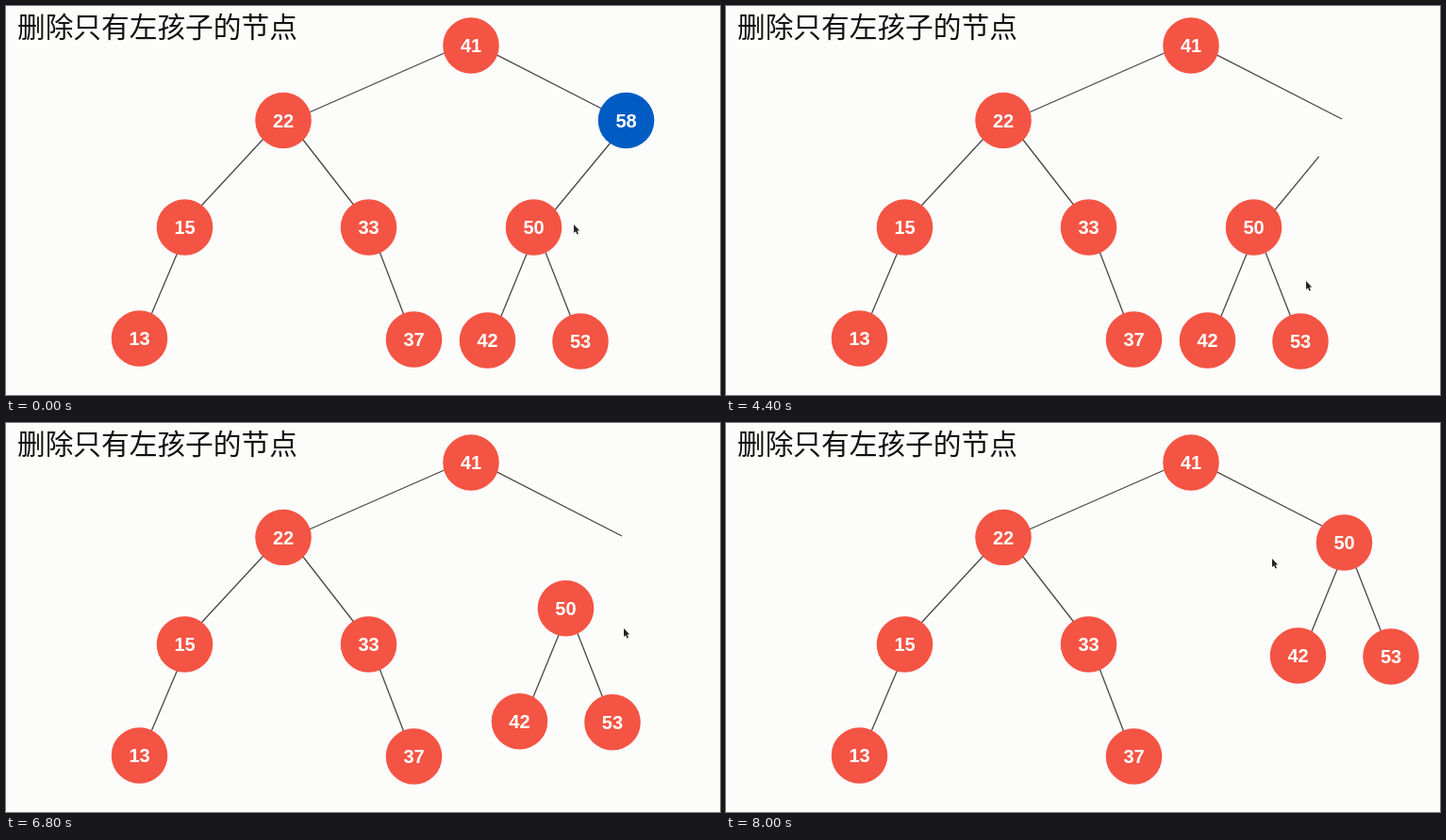
An HTML page with a canvas for the animation above (8100 ms loop, 757x413 px).

```html
<!DOCTYPE html>
<html lang="zh">
<head>
<meta charset="utf-8">
<style>
  html, body { margin: 0; width: 100%; height: 100%; overflow: hidden; background: #fcfcfb; }
  canvas { display: block; }
</style>
</head>
<body>
<canvas id="stage" width="757" height="413"></canvas>
<script>
const ctx = document.getElementById('stage').getContext('2d');
const LOOP = 8100, STEP = 100, GLIDE = 400;
const RED = '#f45443', BLUE = '#005cc3';
const arrow = new Path2D('M0 0V9L2 7.2L3.6 10.6L5 10L3.5 6.6H6.2Z');

// Pointer stops: arrival time, x, y
const stops = [
  [0, 602, 232], [1100, 588, 246], [1400, 670, 200], [2100, 714, 215],
  [3100, 622, 201], [3500, 648, 208], [4400, 615, 292], [4900, 515, 197],
  [5200, 488, 272], [5600, 603, 335], [5800, 645, 174], [6100, 655, 218],
  [7800, 579, 144]
];

const progress = (t, from, to) => Math.min(1, Math.max(0, (t - from) / (to - from)));
const mix = (a, b, p) => a + (b - a) * p;

function line(x1, y1, x2, y2) {
  ctx.beginPath();
  ctx.moveTo(x1, y1);
  ctx.lineTo(x2, y2);
  ctx.stroke();
}

function node(label, x, y, color = RED) {
  ctx.fillStyle = color;
  ctx.beginPath();
  ctx.arc(x, y, 29.8, 0, Math.PI * 2);
  ctx.fill();
  ctx.fillStyle = '#fff';
  ctx.font = 'bold 20px "Liberation Sans", Arial, sans-serif';
  ctx.textAlign = 'center';
  ctx.fillText(label, x, y + 7);
}

// Rests at each stop, then glides so as to arrive at the next one on time
function pointer(t) {
  let [now, x, y] = stops[0];
  for (const [arrival, nextX, nextY] of stops) {
    const p = progress(t, Math.max(now, arrival - GLIDE), arrival || 1);
    x = mix(x, nextX, p);
    y = mix(y, nextY, p);
    now = arrival;
  }
  ctx.save();
  ctx.translate(x, y);
  ctx.fillStyle = '#222';
  ctx.fill(arrow);
  ctx.restore();
}

function fixedTree() {
  line(492, 38, 294, 125);
  line(493, 37.8, 653, 120);
  line(294, 118.3, 190, 230.5);
  line(294, 115, 384, 231);
  line(189, 245, 147, 344);
  line(390, 245, 428, 344);
  node(41, 493, 42);
  node(22, 294, 121.5);
  node(15, 189.5, 235);
  node(33, 384.5, 235);
  node(13, 141.5, 353);
  node(37, 432.5, 354);
}

function movingTree(x, y) {
  line(x, y + 10, x - 41, y + 110);
  line(x + 6, y + 10, x + 46, y + 112);
  node(42, x - 49, y + 120);
  node(53, x + 49.5, y + 121);
  node(50, x, y);
}

function draw(t) {
  ctx.fillStyle = '#fcfcfb';
  ctx.fillRect(0, 0, 757, 413);

  ctx.fillStyle = '#111';
  ctx.font = '29.7px "Noto Sans CJK SC", "Noto Sans CJK", sans-serif';
  ctx.textAlign = 'left';
  ctx.fillText('删除只有左孩子的节点', 12, 33);

  ctx.strokeStyle = '#484848';
  ctx.lineWidth = 1.3;
  fixedTree();

  const wipe = progress(t, 4180, 4720);
  if (wipe < 1) line(mix(660, 583, wipe), mix(122, 215, wipe), 575, 225);

  // Subtree 50 rises into the removed node's place
  const rise = 0.5 - 0.5 * Math.cos(Math.PI * progress(t, 6450, 7420) ** 0.885);
  movingTree(mix(559.5, 655.5, rise), mix(235, 127, rise));

  ctx.globalAlpha = 1 - progress(t, 3700, 4200);
  node(58, 657.5, 121.5, BLUE);
  ctx.globalAlpha = 1;

  pointer(t);
}

function frame() {
  const t = performance.now() % LOOP;
  draw(Math.floor(t / STEP) * STEP);
  requestAnimationFrame(frame);
}
frame();
</script>
</body>
</html>
```
